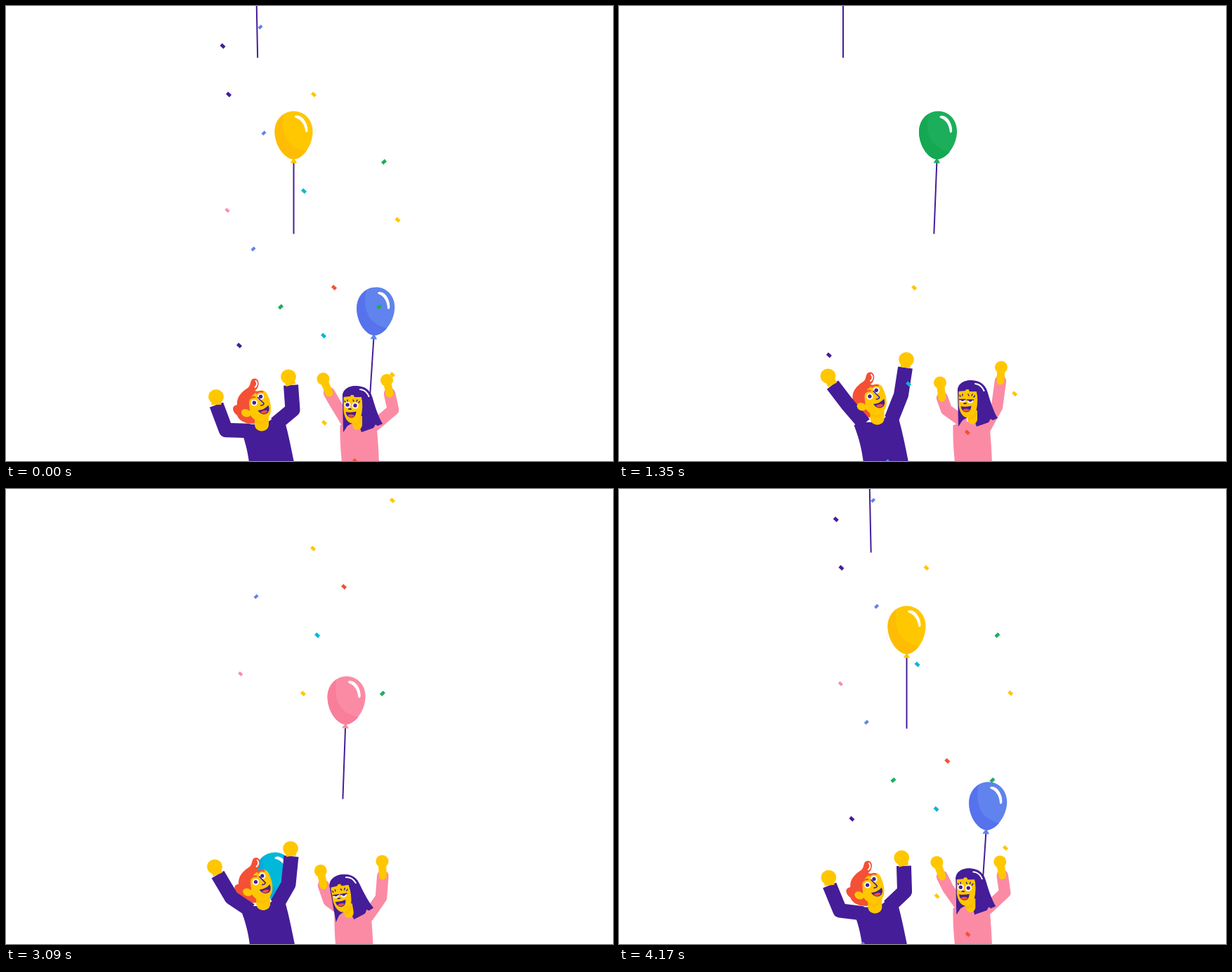
Recreate the animation shown at these times as an HTML page. Size 864x648 px, loop 4.2 s.

```html
<!DOCTYPE html>
<html lang="en">
<head>
<meta charset="utf-8">
<title>Party</title>
<style>
  html, body { margin: 0; width: 100%; height: 100%; overflow: hidden; background: #fff; }
  svg { display: block; width: 864px; height: 648px; }
  .line { fill: none; stroke-linejoin: round; }
</style>
</head>
<body>
<svg id="stage" viewBox="0 0 864 648"></svg>
<script>
const LOOP = 4200, STEP = 30, FRAMES = LOOP / STEP;
const SHOW_START = 80;   // frame in which the party begins
const C = {
  purple: '#451d98', yellow: '#ffc700', amber: '#ffbc05', red: '#f45035', pink: '#fb8ba4',
  teal: '#00b8d9', blue: '#6083ed', green: '#1cae5a', white: '#fff'
};

// colour, shade, final x, drift curve, frames until the drift ends
const balloons = [
  [C.pink, '#f97e9a', 490.8, .012, 45.8],
  [C.teal, '#00acdb', 353.5, -.012, 57.4],
  [C.yellow, C.amber, 409.5, 0, 50],
  [C.blue, '#5672ec', 546.8, .012, 56.5],
  [C.red, '#ed4128', 319, -.002, 45],
  [C.green, '#14a853', 461.5, .012, 55]
];

// colour, x and y when the loop wraps, sideways drift per frame
const confetti = [
  ['yellow', 440, -217.5, -.44], ['purple', 312.4, -121.5, -.3], ['teal', 438.7, -80.5, -.59],
  ['yellow', 549.6, -66.5, .3], ['red', 476, -11.5, .44], ['blue', 362, 30, .44],
  ['purple', 308.5, 57, -.3], ['purple', 317, 126, .55], ['yellow', 438, 126, .44],
  ['blue', 367, 181, .44], ['green', 538, 222, -.43], ['teal', 424, 263.5, -.56],
  ['pink', 315, 291, -.32], ['yellow', 557.5, 304.5, .3], ['blue', 352, 346, -.29],
  ['red', 467, 401, -.32], ['green', 391, 428.5, .57], ['green', 531, 428.5, -.43],
  ['teal', 452, 469.5, .43], ['purple', 332, 483.5, .6], ['yellow', 550, 525, 0],
  ['yellow', 453, 593.5, .43], ['red', 497, 648, .43], ['blue', 346.4, 662, -.26],
  ['teal', 459, 717, .43], ['pink', 353, 772, .52], ['yellow', 407, 800, -.43],
  ['green', 520, 800, -.43]
];

// each arm: hand, wrist, elbow, shoulder as x,y in a low, a middle and a raised pose
const arms = {
  manL: [[299, 556.5, 299.5, 568, 313, 604, 347, 605],
         [297, 538, 301.5, 549, 321, 582, 348, 600],
         [297.5, 527, 304, 539.5, 325, 567, 349, 595]],
  manR: [[402, 528, 405.5, 540, 408, 575, 384, 595],
         [405, 512, 406, 523, 402, 563, 386, 591],
         [409, 503.5, 407.5, 515, 401.5, 554, 388, 588]],
  girlL: [[451.5, 531, 460, 551, 468, 565, 485, 593],
          [454.5, 533.5, 460, 554, 468, 575, 486, 592],
          [457, 536.5, 460, 558, 466, 575, 487, 590]],
  girlR: [[542, 533, 546, 552, 551, 575, 524, 598],
          [543, 525.5, 545, 546, 545, 574, 524, 599],
          [544, 514.5, 543, 534, 538, 571, 522, 600]]
};

const balloonArt = ([color, shade]) => `<g class="balloon">
  <path d="M0 70V174" stroke="${C.purple}" stroke-width="2" stroke-linecap="round"/>
  <path d="M0 67L4 73.5H-4Z" fill="${color}" stroke="${color}" stroke-linejoin="round"/>
  <path d="M0 0C15 0 27 12 27 29C27 50 12 68.5 0 68.5S-27 50-27 29C-27 12-15 0 0 0Z" fill="${color}"/>
  <path d="M-15 5C-20 40-2 55 18 57C12 65 5 68.5 0 68.5C-12 68.5-27 50-27 29C-27 19-22 10-15 5Z" fill="${shade}"/>
  <path d="M3 6.5C12 4.5 20 17 20 27C20 31 16.5 31 16.5 27C15 18 10 12 4 10C1 9 1 7 3 6.5Z" fill="#fff"/>
</g>`;

const confettiArt = ([name]) => {
  const small = name === 'blue' || name === 'pink';
  const [w, h] = small ? [5.8, 4] : [6.6, 4.6];
  const angle = name === 'blue' || name === 'green' ? -42 : 42;
  return `<g class="confetti"><rect x="${-w / 2}" y="${-h / 2}" width="${w}" height="${h}"
    transform="rotate(${angle})" fill="${C[name]}"/></g>`;
};

const armArt = (id, color, width, cap) => `<g id="${id}">
  <path class="line sleeve" stroke="${color}" stroke-width="${width}" stroke-linecap="${cap}"/>
  <path class="line wrist" stroke="${C.yellow}" stroke-width="${cap === 'round' ? 11 : 14}" stroke-linecap="${cap}"/>
  <ellipse class="fist" fill="${C.yellow}" rx="${cap === 'round' ? 9 : 10.8}" ry="${cap === 'round' ? 9 : 10.5}"/>
</g>`;

const eye = (x, y) => `<circle cx="${x}" cy="${y}" r="4.6" fill="#fff"/>
  <circle cx="${x}" cy="${y}" r="2.7" fill="${C.purple}"/>`;

const manArt = `<g id="man">
  <g class="manHead">
    <path fill="${C.red}" d="M329 568C328 555 338 548 344 544C350 540 346 531 354 530.5C362 531 361 544 354 548
      L366 550L360 593C346 598 332 592 329 583C321 577 321 569 329 568Z"/>
    <path class="line" d="M355.5 534C358.5 537 357 541 354.5 543" stroke="#fff" stroke-width="2" stroke-linecap="round"/>
  </g>
  <path id="manTorso" fill="${C.purple}" d="M333 600C340 618 344 634 346 650V760H410V650C406 630 402 610 397 592
    L380 586C374 596 352 597 345 595Z"/>
  ${armArt('manL', C.purple, 20.5, 'butt')}${armArt('manR', C.purple, 21, 'butt')}
  <g class="manHead">
    <path fill="${C.yellow}" d="M354 580H374V596C374 602 369 605.5 364 605.5S354 602 354 596Z"/>
    <path fill="${C.yellow}" d="M346 566C346 558 350 554 357 550C363 546 369 547 372 553C375 560 378 568 377 577
      C376 586 368 591 361 591C354 591 350 586 348 583C344 588 335 585 335 578C336 573 343 573 347 577Z"/>
    <path fill="${C.amber}" d="M354 589C360 593 368 592 373 587C371 594 362 599 354 592Z"/>
    ${eye(353.3, 565)}${eye(362.6, 556.3)}
    <path class="line" d="M346 560Q349 556 355 557M356 552Q361 547 366 550" stroke="${C.red}" stroke-width="2.2"/>
    <path class="line" d="M358 557L367 566Q367 569 362 569" stroke="${C.purple}" stroke-width="1.6"/>
    <path fill="${C.purple}" d="M358.5 576Q368 575 373.5 568.5Q377 578 370 581Q363 583 358.5 576Z"/>
    <path fill="${C.red}" d="M362 578.5Q367 574.5 372.5 576.5Q371 580 368 580.5Q364 581 362 578.5Z"/>
  </g>
</g>`;

const girlArt = `<g id="girl">
  <g class="sway">${armArt('girlL', C.pink, 16.5, 'round')}${armArt('girlR', C.pink, 16.5, 'round')}</g>
  <path fill="${C.pink}" d="M475.5 597L490 592H512L528 602Q530 625 531 650V760H478V650Q475 620 475.5 597Z"/>
  <g class="sway"><g id="girlHead">
    <path fill="${C.purple}" d="M479 557C478 546 488 540.5 499 541C512 541.5 519 548 522 559C526 573 531 587 536 595
      L529 598L526 596L523 601L506 607L500 590L486 598L480 607Z"/>
    <path fill="${C.yellow}" d="M493.5 584H507V597C506 602 503 604 500 603.5C496 603 493.5 600 493.5 597Z"/>
    <path fill="${C.yellow}" d="M480.5 554H506Q509 572 505 586C502 593 496 595 491 594C484 592 480.5 582 480.5 574Z"/>
    <path fill="${C.amber}" d="M493.5 594.5Q502 593 506 584Q508 596 494 599Z"/>
    <path fill="${C.purple}" d="M479 557C479 546 489 541 499 541L520 553L509 575L506 557L496 557L493 550L490 556Z"/>
    <path class="line" d="M504 546C510 546.5 514 550 516.5 556" stroke="#fff" stroke-width="2" stroke-linecap="round"/>
    ${eye(486, 568)}${eye(497, 569)}
    <g id="lids">
      <path fill="${C.yellow}" d="M480.8 563H502V569H480.8Z"/>
      <path class="line" d="M481 568.5H490.5M492 569H502" stroke="${C.purple}" stroke-width="1.6"/>
    </g>
    <path class="line" d="M482 562.5L483 564M486 561V563M495 563L494 561M499 563L500 561M502 565L503.5 563"
      stroke="${C.purple}" stroke-width="1.5" stroke-linecap="round"/>
    <path class="line" d="M488 574H491" stroke="${C.purple}" stroke-width="1.8" stroke-linecap="round"/>
    <path fill="${C.purple}" d="M483.5 578Q491 579.5 498.5 577.5Q498 586.5 491 586.5Q485 586 483.5 578Z"/>
    <path fill="${C.red}" d="M486 583Q491 580 496.5 583Q494.5 585.7 491 585.7Q488 585.5 486 583Z"/>
  </g></g>
</g>`;

const stage = document.getElementById('stage');
stage.innerHTML = balloons.map(balloonArt).join('') +
  `<g id="people">${manArt}${girlArt}</g>` + confetti.map(confettiArt).join('');

const byId = id => document.getElementById(id);
const all = name => [...stage.querySelectorAll('.' + name)];
const place = (el, x, y, turn = '') => el.setAttribute('transform', `translate(${x} ${y}) ${turn}`);
const clamp = v => Math.max(0, Math.min(1, v));
const balloonEls = all('balloon'), confettiEls = all('confetti');
const manHeads = all('manHead'), swayEls = all('sway');

function track(keys, t) {
  const i = Math.max(1, keys.findIndex(k => k[0] >= t));
  const [t0, a] = keys[i - 1], [t1, b] = keys[i];
  return a + (b - a) * (t - t0) / (t1 - t0);
}

// parabola through the low (0), middle (k) and raised (1) values
const blend = ([a, m, b], u, k) =>
  a * (u - k) * (u - 1) / k + m * u * (u - 1) / (k * (k - 1)) + b * u * (u - k) / (1 - k);

function poseArm(id, u, k) {
  const poses = arms[id];
  const [hx, hy, wx, wy, ex, ey, sx, sy] =
    poses[0].map((_, i) => blend(poses.map(p => p[i]), u, k).toFixed(2));
  const [sleeve, wrist, fist] = byId(id).children;
  sleeve.setAttribute('d', `M${wx} ${wy}L${ex} ${ey}L${sx} ${sy}`);
  wrist.setAttribute('d', `M${hx} ${hy}L${wx} ${wy}`);
  fist.setAttribute('cx', hx);
  fist.setAttribute('cy', hy);
}

const BEAT = 500;
const liftKeys = [[0, 1.2], [120, 1], [160, .6], [240, .1], [270, 0], [310, .37], [350, .97], [420, 1.22], [500, 1.2]];
const swayKeys = [[0, 4], [120, 0], [310, 0], [350, 6], [420, 8], [500, 4]];

function drawPeople(n) {
  const ms = (n - 81) * STEP;
  const rise = clamp((ms - 60) / 360), sink = clamp((ms - 3200) / 220);
  place(byId('people'), 0, 170 * ((1 - rise) ** 3 + sink ** 2));
  byId('people').style.display = ms > 60 && sink < 1 ? '' : 'none';

  const beat = ((ms % BEAT) + BEAT) % BEAT;
  const u = track(liftKeys, beat);
  const lean = 1 - clamp((ms - 690) / 210);   // the girl starts out leaning left
  const sway = track(swayKeys, beat) * (1 - lean);

  poseArm('manL', u, .6);
  poseArm('manR', u, .6);
  poseArm('girlL', u, .37);
  poseArm('girlR', u, .37);
  place(byId('manTorso'), 1.5 * u, -3 * u);
  manHeads.forEach(el => place(el, 3.6 * u, -9 * u));
  place(byId('girl'), -8 * lean, 9 * lean);
  swayEls.forEach(el => el.setAttribute('transform', `rotate(${sway} 505 620)`));
  place(byId('girlHead'), 3 * u - 7 * lean, -8 * u + 3 * lean, `rotate(${-9 * lean} 500 590)`);
  const blink = Math.abs(ms - 3120) <= 60;
  byId('lids').style.display = blink || lean > .5 ? '' : 'none';
}

function draw(ms) {
  let n = Math.floor(ms % LOOP / STEP);
  if (n < SHOW_START) n += FRAMES;

  balloons.forEach(([, , endX, curve, endN], i) => {
    const age = n - 80.2 - 15 * i, left = endN - age;
    const tilt = .065 * 2 * curve * left * 180 / Math.PI;
    place(balloonEls[i], endX - curve * left * left, 648 - 16.72 * age, `rotate(${tilt} 0 34)`);
    balloonEls[i].style.display = age > 0 && age < 52 ? '' : 'none';
  });
  confetti.forEach(([, x, y, drift], i) =>
    place(confettiEls[i], x + drift * (n - FRAMES), y + 13.75 * (n - FRAMES)));
  drawPeople(n);
}

const start = performance.now();
function tick() {
  draw(performance.now() - start);
  requestAnimationFrame(tick);
}
draw(0);
requestAnimationFrame(tick);
</script>
</body>
</html>
```
